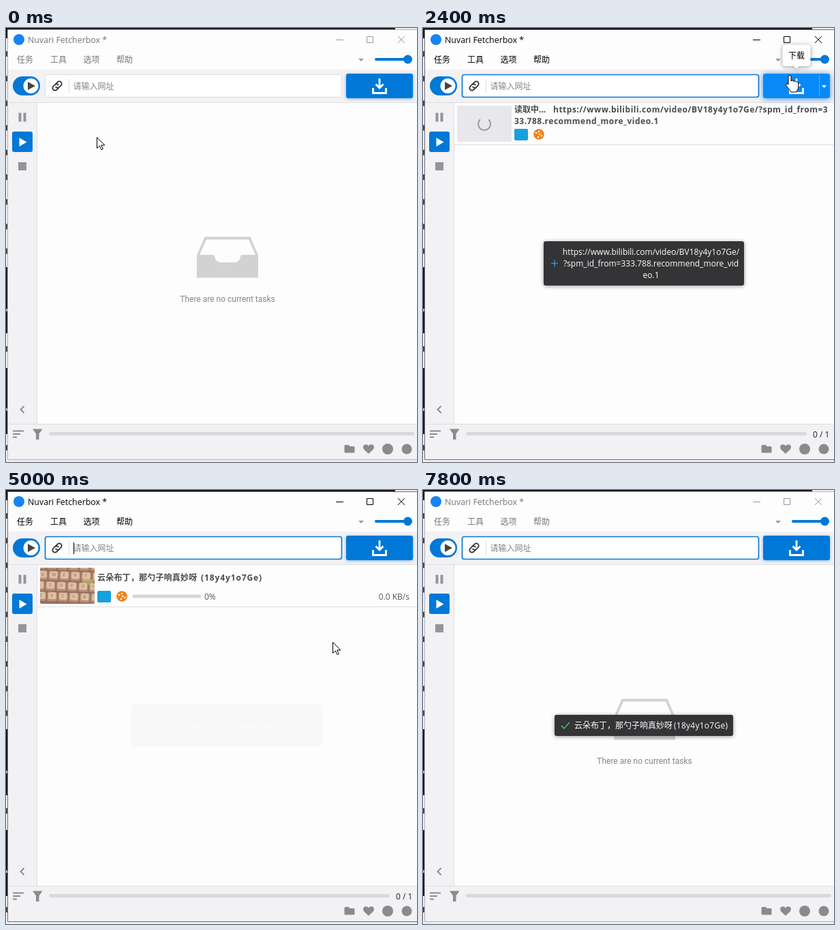
Animation, 603 px wide and 637 px high, one loop 7.87 s. Source, as an HTML page:

```html
<!DOCTYPE html>
<html lang="zh">
<head>
<meta charset="utf-8">
<style>
html, body { margin: 0; width: 100%; height: 100%; overflow: hidden; background: #f0f0f0; }
svg { display: block; width: 603px; height: 637px; }
text { font: 12px "Open Sans", "Noto Sans CJK SC", "Noto Sans CJK", "Noto Sans", sans-serif; white-space: pre; }
.bold { font-weight: 700; fill: #4a4a4c; letter-spacing: .5px; }
.small { fill: #555; }
.soft { filter: drop-shadow(0 1px 3px rgba(0,0,0,.4)); }
.line { stroke: #dedee1; fill: none; }
</style>
</head>
<body>
<svg viewBox="0 0 603 637">
  <defs>
    <clipPath id="fieldClip"><rect x="98" y="70" width="368" height="30"/></clipPath>
    <clipPath id="thumbClip"><rect x="50" y="114" width="80" height="53" rx="2"/></clipPath>
    <linearGradient id="keyTone" x2="1" y2="1">
      <stop stop-color="#d9b99f"/><stop offset="1" stop-color="#e2c6a8"/>
    </linearGradient>
  </defs>

  <!-- desktop behind the window -->
  <rect width="603" height="637" fill="#eeeef0"/>
  <path d="M0 0H571V3H3V15H0ZM0 351H3V448H0ZM0 499H3V596H0Z" fill="#171722"/>
  <path d="M1 34V335M1 467V479M1 612V625" stroke="#444" stroke-width="2" stroke-dasharray="8 28.2"/>
  <path d="M0 414H3M0 560H3" stroke="#aaa" stroke-width="4"/>

  <!-- window panels -->
  <rect x="3" y="2" width="600" height="631" fill="#fdfdfe"/>
  <path d="M3 61H603V110H46V581H603V633H3Z" fill="#f2f2f5"/>
  <path class="line" d="M3 109.5H603M45.5 110V581M3 581.5H603"/>
  <path id="frame" d="M2.5 633.5V2.5H603M2.5 633.5H603" fill="none"/>

  <!-- title bar and menu -->
  <circle cx="19" cy="17" r="8" fill="#1683f3"/>
  <g id="chrome">
    <text x="32" y="22" style="font-size:12.4px">Nuvari Fetcherbox *</text>
    <text x="16" y="51">任务</text><text x="65" y="51">工具</text>
    <text x="113.500" y="51">选项</text><text x="162" y="51">帮助</text>
  </g>
  <path id="controls" d="M484 17.500H495M529.500 12.500H538.500V21.500H529.500ZM575 12L585 22M585 12L575 22" fill="none"/>
  <path d="M517 45H525L521 49Z" fill="#999"/>
  <path d="M543 46H589" stroke="#0078d7" stroke-width="4" stroke-linecap="round"/>
  <circle cx="589.500" cy="46" r="6.500" fill="#0078d7"/>

  <!-- toolbar -->
  <rect x="10" y="71" width="40" height="28" rx="14" fill="#0078d7"/>
  <circle cx="36.500" cy="85" r="11" fill="#fff"/>
  <path d="M32 79V91L43 85Z" fill="#444"/>
  <rect id="field" x="57.500" y="68.500" width="435" height="33" rx="3" fill="#fff"/>
  <g fill="none" stroke="#333" stroke-width="1.800" transform="translate(75 85) rotate(-45)">
    <path d="M1 3.500H-4.500A3.500 3.500 0 0 1 -4.500-3.500H-1A3.500 3.500 0 0 1 2.300 1M-1-3.500H4.500A3.500 3.500 0 0 1 4.500 3.500H1A3.500 3.500 0 0 1 -2.300-1"/>
  </g>
  <path class="line" d="M92.500 75V96"/>
  <text id="hint" x="98.500" y="90" fill="#858585">请输入网址</text>
  <g clip-path="url(#fieldClip)"><text id="typed" x="465" y="90" text-anchor="end" fill="#222"></text></g>
  <path id="caret" d="M99.500 77V94" stroke="#000"/>
  <g id="clear">
    <path d="M469 85L474 79H485V91H474Z" fill="#bbb"/>
    <path d="M476 82L482 88M482 82L476 88" stroke="#fff" stroke-width="1.500"/>
  </g>
  <rect id="button" x="499" y="67" width="98" height="36" rx="3"/>
  <g id="split">
    <path d="M581.500 70V100" stroke="#fff" opacity=".3"/><path d="M585 84H592L588.500 88Z" fill="#fff"/>
    <rect id="press" x="499" y="67" width="82" height="36" rx="3" fill="#0067b8"/>
  </g>
  <path id="arrowDown" d="M548 74V87M542.500 82.500L548 88L553.500 82.500M538.500 88V95.500H557.500V88" fill="none" stroke="#fff" stroke-width="2.800"/>

  <!-- side and bottom bars -->
  <path d="M18.500 124.500h4v13h-4ZM25.500 124.500h4v13h-4ZM18 197h12v12h-12Z" fill="#959597"/>
  <rect x="9" y="152" width="30" height="30" rx="3" fill="#0078d7"/>
  <path d="M19.500 161V174L30.500 167.500Z" fill="#fff"/>
  <path d="M26.500 555L21.500 560L26.500 565" fill="none" stroke="#888" stroke-width="1.800"/>
  <path d="M10 591.500H26M10 596H21M10 600.500H16" stroke="#8b8b8d" stroke-width="1.800"/>
  <path d="M39 588.500H53.500L48.500 595.500V604H44V595.500Z" fill="#8b8b8d"/>
  <path id="total" stroke="#d9d9dc" stroke-width="5" stroke-linecap="round"/>
  <text id="count" x="572" y="600.500" fill="#222">0 / 1</text>
  <g fill="#8b8b8d">
    <path d="M498 612h5l1.500 2H510q1.500 0 1.500 1.500V622q0 1.500-1.500 1.500H498q-1.500 0-1.500-1.500V613.500q0-1.500 1.500-1.500Z"/>
    <path d="M532 625C527 620 524 618.500 524 615C524 610.500 530 610 532 613.500C534 610 540 610.500 540 615C540 618.500 537 620 532 625Z"/>
    <circle cx="560" cy="618" r="8"/><circle cx="588" cy="618" r="7.500"/>
  </g>

  <g id="empty">
    <path fill-rule="evenodd" fill="#d2d2d3" d="M291.500 306.500H358.500L370 333.500V366.500H280V333.500ZM294 310.500L284 333H303.500Q306 333 306 336Q308 344 315 344H335Q342 344 344 336Q344 333 346.500 333H366L356 310.500Z"/>
    <text x="325" y="402" text-anchor="middle" fill="#858587" style="font-family:Roboto,sans-serif">There are no current tasks</text>
  </g>

  <g id="row">
    <path class="line" d="M46 171.500H603"/>
    <rect x="134" y="148" width="20" height="17" rx="2" fill="#18a0de"/>
    <circle cx="170" cy="156" r="7.800" fill="#f08218"/>
    <path d="M166 154h.1M170 152h.1M169 160h.1M174 158h.1M171 156h.1" stroke="#fff" stroke-width="2.500" stroke-linecap="round"/>
    <g id="loading">
      <rect x="50" y="114" width="80" height="53" rx="2" fill="#e8e8eb"/>
      <circle id="spinner" cx="90" cy="141" r="9" fill="none" stroke="#9b9b9d" stroke-width="2" stroke-dasharray="43 13.550"/>
      <text class="bold" x="134" y="124" style="letter-spacing:0">读取中...</text>
      <text class="bold" x="191" y="124" id="link1"></text>
      <text class="bold" x="134" y="141" id="link2"></text>
    </g>
    <g id="ready">
      <g clip-path="url(#thumbClip)"><g id="thumb" transform="rotate(2 90 140)"></g></g>
      <text class="bold" x="134" y="133" style="letter-spacing:.2px">云朵布丁，那勺子响真妙呀</text>
      <text class="bold" x="286" y="133" style="letter-spacing:.9px">(18y4y1o7Ge)</text>
      <rect x="186" y="153.500" width="100" height="5" rx="1" fill="#d7d7d9"/>
      <text class="small" x="291" y="161">0%</text>
      <text class="small" x="592" y="161" text-anchor="end">0.0 KB/s</text>
    </g>
  </g>

  <g id="added" class="soft">
    <rect x="177" y="313" width="294" height="65" rx="3" fill="#303133"/>
    <path d="M188 345.500H198M193 340.500V350.500" stroke="#2f86e6" stroke-width="1.600"/>
    <g id="addedText" fill="#fff" text-anchor="middle"></g>
  </g>
  <g id="done" class="soft">
    <rect x="193" y="330" width="262" height="31" rx="3" fill="#303133"/>
    <path d="M203 346L207 350L215 341" fill="none" stroke="#45ad50" stroke-width="1.800"/>
    <text x="222" y="350" fill="#fff">云朵布丁，那勺子响真妙呀</text>
    <text x="368" y="350" fill="#fff" style="letter-spacing:.25px">(18y4y1o7Ge)</text>
  </g>

  <g id="tip" class="soft">
    <path d="M532 24.500H564Q568.500 24.500 568.500 29V52Q568.500 56 564 56H552L548 60L544 56H532Q527.500 56 527.500 52V29Q527.500 24.500 532 24.500Z" fill="#fff"/>
    <text x="536" y="45">下载</text>
  </g>

  <g id="pointer" stroke="#000">
    <path id="arrow" d="M.5.5V16.500L4.300 13L7 18.700L9.300 17.600L6.700 12H11.800Z" fill="#fff"/>
    <path id="beam" d="M-3.500-8H-1L0-7L1-8H3.500M0-7V7M-3.500 8H-1L0 7L1 8H3.500" fill="none"/>
    <path id="hand" transform="translate(-6 -1)" fill="#fff" d="M4 14V2.500a2 2 0 0 1 4 0V9c0-1.500 3.500-1.500 3.800.5.800-1.300 3.300-1 3.600 1 1-1.200 3.200-.6 3.300 1.500V17c0 4-2 5-2.500 8H7.500C7 22 3 19 .8 15.200c-.9-2 1.500-3.200 3.200-1.200z"/>
  </g>
</svg>
<script>
const LOOP = 7870, STEP = 1000 / 15;
const URL_TEXT = "https://www.bilibili.com/video/BV18y4y1o7Ge/?spm_id_from=333.788.recommend_more_video.1";
const $ = id => document.getElementById(id);
const set = (id, attrs) => { for (const k in attrs) $(id).setAttribute(k, attrs[k]); };
const show = (id, on) => $(id).setAttribute("opacity", +on);
const clamp = v => Math.max(0, Math.min(1, v));
const ramp = (t, start, length) => clamp((t - start) / length);
const within = (t, a, b) => t >= a && t < b;

// pointer stops: time, x, y
const PATH = [
  [0, 133, 160], [60, 133, 160], [330, 152, 86], [780, 152, 86], [1130, 160, 87], [1530, 440, 84],
  [1800, 532, 80], [2067, 536, 74], [2400, 538, 70], [3130, 538, 68], [3200, 538, 70],
  [3867, 485, 224], [4060, 482, 223], [4600, 482, 223], [5000, 479, 223], [5270, 479, 223],
  [5330, 477, 223], [5500, 477, 223], [6000, 470, 227], [6200, 469, 228], [6330, 468, 230],
  [6470, 467, 232], [6733, 464, 235], [7200, 490, 512], [7340, 500, 650], [LOOP, 500, 650]
];
const CARET_ON = [[800, 1130], [1870, 2400], [2930, 3465], [3995, 4530], [4995, 5530], [5995, 6530], [7060, 7395]];

function pointerAt(t) {
  const i = Math.max(1, PATH.findIndex(p => p[0] >= t));
  const [t0, x0, y0] = PATH[i - 1], [t1, x1, y1] = PATH[i];
  const u = ramp(t, t0, t1 - t0), e = u * u * (3 - 2 * u);
  return [x0 + (x1 - x0) * e, y0 + (y1 - y0) * e];
}

function placeToast(id, amount, rise) {
  const scale = .95 + .05 * amount;
  set(id, {
    opacity: amount * .98,
    transform: `translate(324 ${345.5 + rise}) scale(${scale}) translate(-324 -345.5)`
  });
}

function buildStatic() {
  $("typed").textContent = URL_TEXT;
  $("link1").textContent = URL_TEXT.slice(0, 58);
  $("link2").textContent = URL_TEXT.slice(58);
  $("addedText").innerHTML = [[0, 44], [44, 83], [83]].map(([a, b], i) =>
    `<text x="334.5" y="${333 + 17 * i}">${URL_TEXT.slice(a, b)}</text>`).join("");

  let keys = '<rect x="45" y="108" width="92" height="66" fill="#95705d"/>';
  ["QWERTY", "QWERTY", "ASDFGH", "ZXCVBN"].forEach((letters, row) => {
    [...letters].forEach((letter, col) => {
      const x = 43 + col * 16 + row * 3 - (row > 1 ? 7 : 0), y = 104 + row * 15.5;
      keys += `<rect x="${x}" y="${y}" width="14.5" height="13.5" rx="2.500" fill="#b98f78"/>
        <rect x="${x + 1.5}" y="${y + .5}" width="11.500" height="10" rx="2" fill="url(#keyTone)"/>
        <text x="${x + 5}" y="${y + 7.5}" fill="#a85a50" style="font-size:6px">${letter}</text>`;
    });
  });
  $("thumb").innerHTML = keys + '<rect x="112" y="130" width="16" height="8" rx="3" fill="#c8d070" opacity=".5"/>';
}

function draw(t) {
  const active = within(t, 795, 7395);
  const ink = active ? "#000" : "#999";
  set("chrome", { fill: active ? "#000" : "#777" });
  set("controls", { stroke: ink });
  set("frame", { stroke: active ? "#6a6a72" : "#b4b4b8" });

  const focused = t >= 795, hovered = t > 190;
  set("field", { stroke: focused ? "#0f79cd" : hovered ? "#b5b5b8" : "#dedee2", "stroke-width": focused ? 1.7 : 1 });
  const filled = within(t, 1130, 1995);
  show("typed", filled);
  show("hint", !filled);
  show("caret", CARET_ON.some(([a, b]) => within(t, a, b)));
  set("clear", { opacity: ramp(t, 1130, 150) * (1 - .9 * ramp(t, 1990, 160)) * (t < 2195) });

  const over = within(t, 1720, 3260), pressed = within(t, 1925, 2130);
  set("button", {
    fill: over && !pressed ? "#078af8" : "#0078d7",
    style: `filter:drop-shadow(0 1px ${over ? 4 : 2}px rgba(0,100,200,${over ? .7 : .45}))`
  });
  show("split", over);
  show("press", pressed);
  set("arrowDown", { opacity: pressed ? .5 : 1 });
  set("tip", { opacity: ramp(t, 1800, 180) * (1 - ramp(t, 3200, 180)) });

  const listed = within(t, 2190, 6525), ready = t >= 3590;
  show("row", listed);
  show("empty", !listed);
  show("loading", !ready);
  show("ready", ready);
  set("spinner", { transform: `rotate(${t * .36 - 190} 90 141)` });

  const counted = within(t, 2190, 7395);
  show("count", counted);
  set("total", { d: `M65.5 595.5H${counted ? 560.5 : 596.5}` });

  // the first notice leaves a faint trace until the list changes
  const enter = ramp(t, 1962, 300), leave = ramp(t, 4620, 380);
  const shown = t < 6465 ? enter * Math.max(.02, 1 - leave) : 0;
  placeToast("added", shown, 35 * (1 - enter));
  const finish = ramp(t, 6538, 300);
  placeToast("done", finish, 35 * (1 - finish));

  const [x, y] = pointerAt(t);
  set("pointer", { transform: `translate(${Math.round(x)} ${Math.round(y)})` });
  const onButton = x > 499 && y > 66 && y < 103, onText = x > 93 && x < 490 && y > 69 && y < 101;
  show("hand", onButton);
  show("beam", onText);
  show("arrow", !onButton && !onText);
}

function tick() {
  const t = performance.now() % LOOP;
  draw(Math.floor((t + 4) / STEP) * STEP);
  requestAnimationFrame(tick);
}

buildStatic();
tick();
</script>
</body>
</html>
```
